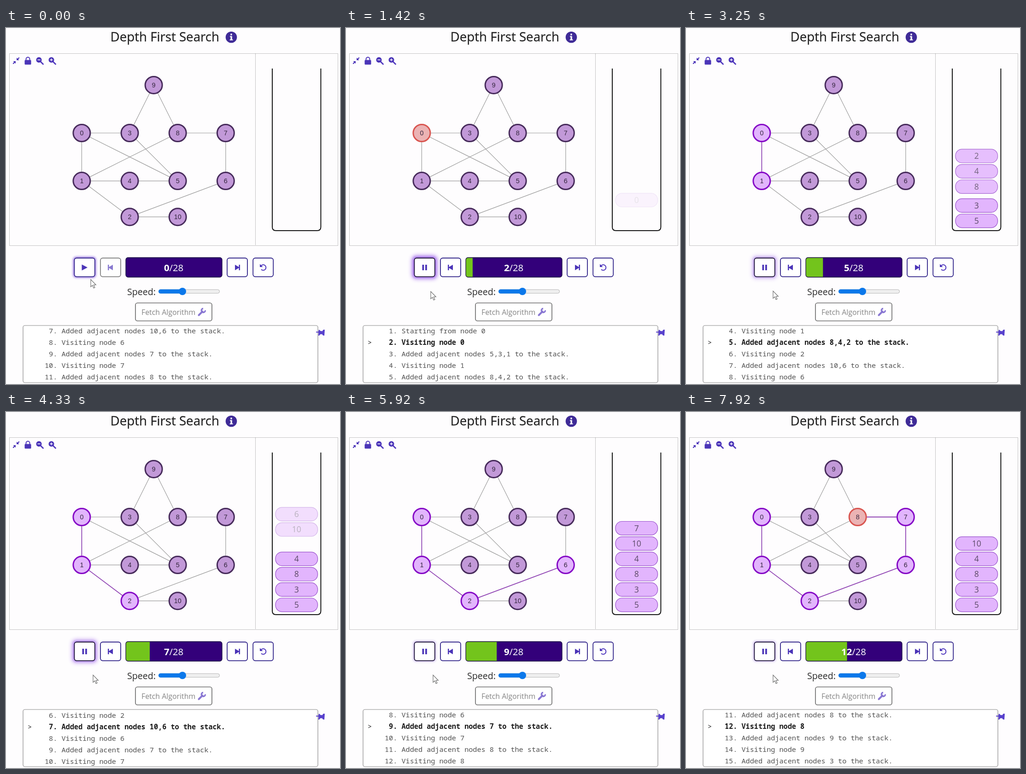
Recreate the animation shown at these times as an HTML page. Size 725 by 773 pixels, loop 8000 ms.

```html
<!DOCTYPE html>
<html lang="en">
<head>
<meta charset="utf-8">
<title>Depth First Search</title>
<style>
html, body { margin: 0; width: 100%; height: 100%; overflow: hidden; background: #fefdfe; }
svg { display: block; width: 100vw; height: 100vh; }
.ui { font-family: "Open Sans", "Noto Sans", sans-serif; }
.node text { font: 14.4px "Liberation Sans", Arial, sans-serif; fill: #35273f; text-anchor: middle; }
.pill text { font-size: 17.5px; fill: #5b4a68; text-anchor: middle; }
.log text { font: 15.2px "Noto Sans Mono", "DejaVu Sans Mono", monospace; fill: #505050; white-space: pre; }
.log text.on { font-weight: bold; fill: #1a1a1a; }
.log text.mark { fill: #222; }
.btn rect { fill: #fff; stroke: #32258a; stroke-width: 1.8; }
.btn path, .icon { fill: #4b35b8; }
.line { fill: none; stroke: #5038bd; stroke-width: 2; }
</style>
</head>
<body>
<svg viewBox="0 0 725 773" preserveAspectRatio="none">
  <defs>
    <clipPath id="logClip"><rect x="38" y="647" width="638" height="122"/></clipPath>
    <clipPath id="barClip"><rect x="260" y="498" width="209" height="43" rx="5"/></clipPath>
    <filter id="soft" x="-50%" y="-50%" width="200%" height="200%"><feGaussianBlur stdDeviation="4"/></filter>
    <filter id="near" x="-50%" y="-50%" width="200%" height="200%"><feGaussianBlur stdDeviation="2"/></filter>
  </defs>

  <g class="ui">
    <text x="226.5" y="28.5" font-size="27.7" font-weight="500" fill="#222" stroke="#222" stroke-width=".3">Depth First Search</text>
    <circle cx="489" cy="20" r="12.3" fill="#3f2b97"/>
    <path d="M486 17.5h4.8v7.2h1.7v2h-6.8v-2h1.8v-5.2H486z" fill="#fff"/>
    <circle cx="489" cy="14" r="1.9" fill="#fff"/>
  </g>

  <g fill="none" stroke="#8a8a8a" stroke-dasharray="1 1">
    <rect x="7.5" y="55.5" width="713" height="417"/>
    <path d="M541.5 56V472"/>
  </g>

  <g class="icon">
    <path d="M23 70v-5.5l2 2 3-3 1.5 1.5-3 3 2 2zM21 72v5.5l-2-2-3 3-1.5-1.5 3-3-2-2z"/>
    <rect x="40.5" y="69.5" width="14" height="10" rx="1.5"/>
    <path class="line" d="M43.5 70v-2.5a4 4 0 0 1 8 0V70"/>
    <g id="lens">
      <circle cx="71.5" cy="69.2" r="6"/>
      <path d="M75.5 73.5l5 5" stroke="#5038bd" stroke-width="2.8" stroke-linecap="round"/>
      <path d="M68.5 69.2h6" stroke="#fff" stroke-width="1.5"/>
    </g>
    <use href="#lens" x="27"/>
    <path d="M98.5 66.2v6" stroke="#fff" stroke-width="1.5"/>
  </g>

  <path d="M578 88V432q0 8 8 8H675.4q8 0 8-8V88" fill="none" stroke="#151515" stroke-width="2"/>
  <g id="edges"></g>
  <g id="nodes"></g>
  <g id="pills" class="ui"></g>

  <rect id="ring" x="145.5" y="496.5" width="50" height="46" rx="7" fill="#8358dd" filter="url(#near)"/>
  <rect id="glow" x="143" y="494" width="55" height="51" rx="9" fill="#8b3fe8" filter="url(#soft)"/>
  <g class="btn">
    <rect id="playBox" x="148.4" y="499.5" width="44.4" height="40.6" rx="5"/>
    <path id="playIcon"/>
    <g id="prev">
      <rect x="205" y="499.5" width="44" height="40.6" rx="5"/>
      <path d="M221 514h2.5v5l8.5-5v12l-8.5-5v5H221z"/>
    </g>
    <rect x="480" y="499.5" width="44" height="40.6" rx="5"/>
    <path d="M508 514h-2.5v5l-8.5-5v12l8.5-5v5h2.5z"/>
    <rect x="536.2" y="499.5" width="44" height="40.6" rx="5"/>
    <path class="line" style="fill:none" d="M553.5 516.5a6 6 0 1 1 .5 7.8"/>
    <path d="M551 512.5v6.5h6.5z"/>
  </g>

  <g clip-path="url(#barClip)">
    <rect x="260" y="498" width="209" height="43" fill="#33007a"/>
    <rect id="bar" x="260" y="498" height="43" fill="#73c41c"/>
  </g>
  <rect x="260" y="498.5" width="209" height="42.5" rx="5" fill="none" stroke="#1d1145" stroke-width="1.3"/>
  <text class="ui" x="364" y="528" font-size="20.3" font-weight="500" fill="#fff" text-anchor="middle"><tspan id="count" font-weight="700"></tspan>/28</text>

  <g class="ui">
    <text x="263" y="580" font-size="19.6" fill="#2b2b2b">Speed:</text>
    <rect x="331.5" y="568" width="132" height="8" rx="4" fill="#efefef" stroke="#b5b5b5"/>
    <rect x="331" y="567.5" width="52" height="9" rx="4.5" fill="#0b78ea"/>
    <circle cx="383" cy="572" r="8" fill="#0b78ea"/>
    <rect x="281" y="597" width="166" height="39" rx="4.5" fill="#fff" stroke="#707070" stroke-width="1.7"/>
    <text x="294" y="623" font-size="15.9" fill="#858585">Fetch Algorithm</text>
    <path d="M418.5 623.5l8-8" stroke="#8a78d3" stroke-width="4" stroke-linecap="round"/>
    <path d="M432.5 613a4.2 4.2 0 1 1-4.5-3.8" fill="none" stroke="#8a78d3" stroke-width="3.2"/>
  </g>

  <rect x="37" y="646" width="640" height="124" rx="4" fill="#fff" stroke="#8b8b8b" stroke-width="1.2"/>
  <g clip-path="url(#logClip)"><g id="log" class="log"></g></g>
  <path d="M673 660h5l.5-4.500 2 .5 2 2h4l1.5-3 3.500-.5v13l-3.500-.5-1.500-2.500-4 .5-2 3-2 .5v-6.500h-5.500z" fill="#5740cc" transform="rotate(4 684 661)"/>
  <path id="cursor" d="M0 0V16l3.7-3.3 2.6 6 2.6-1.2-2.6-5.7h5z" fill="#fff" stroke="#666" stroke-width="1.1"/>
</svg>

<script>
const LOOP = 8000, START = 500, STEP = 620, LAST = 12, PITCH = 25, DROP = 52;
const $ = id => document.getElementById(id);
const clamp = v => Math.min(1, Math.max(0, v));
const smooth = v => (v = clamp(v), v * v * (3 - 2 * v));
const mix = (a, b, k) => a + (b - a) * k;
const at = step => START + (step - 1) * STEP;

// cubic-bezier(0, 0, .58, 1)
function easeOut(x) {
  let lo = 0, hi = 1;
  for (let i = 0; i < 20; i++) {
    const m = (lo + hi) / 2;
    if (1.74 * m * m * (1 - m) + m * m * m < x) lo = m; else hi = m;
  }
  return smooth(lo);
}

function set(el, attrs) {
  for (const k in attrs) el.setAttribute(k, attrs[k]);
}
function add(parent, tag, attrs, text) {
  const el = document.createElementNS("http://www.w3.org/2000/svg", tag);
  set(el, attrs);
  if (text !== undefined) el.textContent = text;
  return parent.appendChild(el);
}

// Node positions on a grid of columns and rows
const places = [
  [0, 0], [0, 1], [1, 1.75], [1, 0], [1, 1], [2, 1], [3, 1], [3, 0], [2, 0], [1.5, -1], [2, 1.75]
].map(([col, row]) => [164.4 + 104.15 * col, 228 + 104.1 * row]);
const links = "0-3 0-1 0-5 1-8 1-4 4-5 1-2 2-6 2-10 3-9 8-9 7-8 6-7 3-5".split(" ");
const visits = [[0, "5,3,1"], [1, "8,4,2"], [2, "10,6"], [6, "7"], [7, "8"], [8, "9"], [9, "3"]];

// Replay the search: log lines, visit steps, walked edges and stack items
const lines = ["Starting from node 0"], visitStep = {}, walked = {}, items = [], stack = [];
const push = (label, step) => {
  const item = { label, slot: stack.length, from: step, to: Infinity };
  stack.push(item);
  items.push(item);
};
push("0", 1);
visits.forEach(([node, next], i) => {
  const step = 2 * i + 2;
  lines.push(`Visiting node ${node}`, `Added adjacent nodes ${next} to the stack.`);
  visitStep[node] = step;
  if (i) walked[[visits[i - 1][0], node].join("-")] = step;
  stack.pop().to = step;
  next.split(",").forEach(n => push(n, step + 1));
});
lines.push("Visiting node 3");

const edges = links.map(id => {
  const [a, b] = id.split("-").map(n => places[n]);
  return { step: walked[id], el: add($("edges"), "line", { x1: a[0], y1: a[1], x2: b[0], y2: b[1] }) };
});
const nodes = places.map(([cx, cy], i) => {
  const g = add($("nodes"), "g", { class: "node" });
  const el = add(g, "circle", { cx, cy, r: 18.5, "stroke-width": 3 });
  add(g, "text", { x: cx, y: cy + 5 }, i);
  return { step: visitStep[i], el };
});
items.forEach(item => {
  item.el = add($("pills"), "g", { class: "pill" });
  add(item.el, "rect", { x: 585, y: -15, width: 91.5, height: 29.6, rx: 14, fill: "#e2b5fd", stroke: "#9850cb", "stroke-width": 1.2 });
  add(item.el, "text", { x: 630.7, y: 6 }, item.label);
});
const rows = lines.map((text, i) =>
  add($("log"), "text", { x: 84, y: 663 + i * PITCH }, `${i + 1}. `.padStart(4) + text));
const mark = add($("log"), "text", { x: 47, class: "mark" }, ">");

const scrollFor = step => step < 1 ? 6 * PITCH : Math.max(0, step - 2) * PITCH;

function draw(t) {
  const step = t < START ? 0 : Math.min(LAST, Math.floor((t - START) / STEP) + 1);
  const since = t - at(step), playing = step > 0;
  const quick = smooth(since / 125);

  edges.forEach(({ step: s, el }) => {
    const on = s <= step;
    set(el, { stroke: on ? "#9146b4" : "#9c9c9c", "stroke-width": on ? 1.8 : 1.2 });
  });
  nodes.forEach(({ step: s, el }) => {
    const [fill, stroke] = s === step ? ["#ebb3b4", "#d95550"]
      : s < step ? ["#e2b5fd", "#8508c6"] : ["#c299d8", "#472b5b"];
    set(el, { fill, stroke });
  });
  items.forEach(({ slot, from, to, el }) => {
    const show = easeOut(clamp((t - at(from)) / 400));
    const hide = smooth((t - at(to)) / 390);
    const k = from > step ? 0 : show * (1 - hide);
    set(el, { opacity: k, transform: `translate(0 ${419 - slot * 33.3 - DROP * (1 - k)})` });
  });

  set($("bar"), { width: playing ? 209 / 28 * (step - 1 + quick) : 0 });
  $("count").textContent = step;

  const pulse = (1 + Math.cos((t - START + 30) / 500 * Math.PI)) / 2;
  set($("ring"), { opacity: playing ? 0.35 : 0.75 });
  set($("glow"), { opacity: playing ? 0.7 * pulse * pulse : 0 });
  $("playBox").style.stroke = playing ? "#1d1238" : "";
  set($("playIcon"), { d: playing ? "M165.5 514h3.8v12h-3.8zM172 514h3.8v12H172z" : "M164.5 513.5l12.5 6.5-12.5 6.5z" });
  set($("prev"), { opacity: playing ? 1 : 0.65 });
  $("prev").firstElementChild.style.stroke = playing ? "" : "#444";

  const scroll = step === 1
    ? mix(scrollFor(0), 0, smooth(since / 300))
    : playing ? mix(scrollFor(step - 1), scrollFor(step), quick) : scrollFor(0);
  set($("log"), { transform: `translate(0 ${-scroll})` });
  rows.forEach((row, i) => row.classList.toggle("on", i + 1 === step));
  set(mark, { y: 663 + (step - 1) * PITCH, opacity: playing ? 1 : 0 });

  const nudge = smooth((t - 1500) / 250);
  const cy = 546 + 26 * smooth((t - 70) / 260) - nudge;
  set($("cursor"), { transform: `translate(${184 + 5 * nudge} ${cy})` });
}

const origin = performance.now();
function tick() {
  draw((performance.now() - origin) % LOOP);
  requestAnimationFrame(tick);
}
tick();
</script>
</body>
</html>
```
